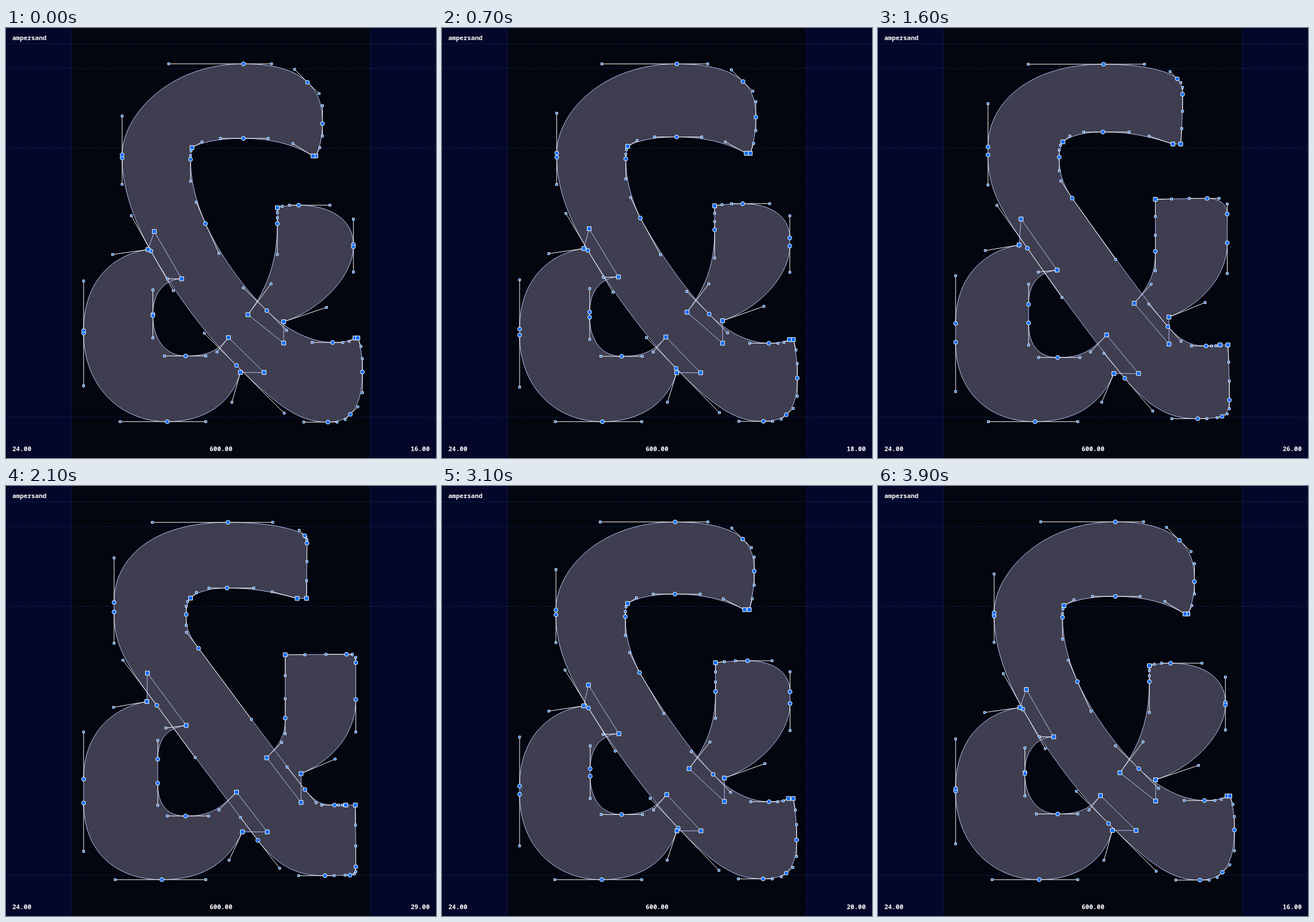
Animation of 748x748 px, one loop 4000 ms. Source, as an HTML page with a canvas:

```html
<!DOCTYPE html>
<html lang="en">
<head>
<meta charset="utf-8">
<title>ampersand</title>
<style>
  html, body { margin: 0; width: 100%; height: 100%; overflow: hidden; background: #04072a; }
  canvas { display: block; }
</style>
</head>
<body>
<canvas id="stage" width="748" height="748"></canvas>
<script>
const ctx = document.getElementById('stage').getContext('2d');
const LOOP = 4000, STEP = 100;
const LEFT = 114, RIGHT = 633.5;

// Each contour is drawn twice with the same commands: round pose, then square pose.
const stem = [
  `M413 62.3 C462 62.3 502 72 524.5 94.5 C544.5 114 550.5 135 550.5 166.3 C550.5 188 546 208 539 222.5
   L534 222.5 C499 201 456 192 413 192 C373 192 341 198 323.5 208 C322 213.5 321 222 321 228.5
   C321 266.5 331 303 347 340.3 C370.5 392 413 452 453.7 491.7 C488 526 532.5 547 568 547
   C586 547 597 545 607 539.3 L612 539.3 C617.5 554 620 575 620 598.3 C620 634.5 612 659 599 672
   C590 681 576 685.5 560 685.5 C518 685.5 484 670 401 587 C345 531 291 457 252 388
   C218 326.5 202 272 202 226 L202 220.7 C202 153 283 62.3 413 62.3`,
  `M386 63.2 C464 63.2 510 77 519.5 86.5 C521.5 89 523.5 93.5 523.5 99.5 C523.5 131.5 523 164.5 522.7 195.5
   L506.5 195.5 C463 184 431 177.5 384.5 177.5 C353 177.5 331.5 185 321 195 C316 201 313.5 209 313.5 223.5
   C313.5 242.5 314 254.5 335 282.3 C427 406 489 489 520 528 C539.5 551 549 555 571.5 555
   C578.5 555 585 555 591 555 L607.7 555 C608 590 608.5 626 608.5 662.3 C608.5 671 606 675 598.3 677
   C590 677 571 677.8 555 677.8 C509 677.8 476 665 438 616.3 C408 576.5 329 472.5 262.3 381.5
   C203.5 303 188 273.5 188 219 L188 202.5 C188 125 254.5 63.2 386 63.2`];

const bowl = [
  `M247 385.3 L258 354 L305.5 436.3 C281 436.3 255.5 455.5 255.5 498 L255.5 500.3
   C255.5 539 275.5 570.5 312.5 570.5 C347.5 570.5 367 563.5 387 538.5 L449 599.2 L407.7 599.2
   C393 651 347.5 684.8 280.5 684.8 C198.5 684.8 135 622.5 135 530.7 L135 526.5
   C135 440 185.5 394 247 385.3`,
  `M245 375 L246 325.5 L313.5 416.5 C278 421 264 442.5 264 475.3 L264 517
   C264 555.5 280.5 574 312.5 574 C352.5 574 370.5 563.5 401 532.5 L454.5 601.7 L411.2 601.7
   C388 651 347.5 684.8 271 684.8 C190 684.8 135 635.5 135 551.5 L135 510
   C135 428 187 385 245 375`];

const arm = [
  `M472 312.5 C480.5 310 493 308.2 509 308.2 C563.5 308.2 604.3 332.5 604.3 376.8 L604.3 380.7
   C604.3 424.5 557.5 486 483 511 L483 548 L420.8 498.7 C461 445 472 394 472 340.3
   C472 330 472 321 472 312.5`,
  `M485.7 293.5 C520 293.5 556.5 292.7 592.3 292.7 C602.5 292.7 608.5 298 608.5 307.3 L608.5 371.5
   C608.5 428 572.5 475 513.3 500.3 L513.3 550.5 L453.5 472.7 C479.5 446 485.7 431 485.7 403.7
   C485.7 370 485.7 330 485.7 293.5`];

// One list of coordinates per command; the last pair is the node.
const parse = d => d.match(/[MLC][^MLC]+/g).map(s => s.slice(1).trim().split(/\s+/).map(Number));

// A node is a corner when the directions before and after it disagree.
function findCorners(segs) {
  return segs.map((seg, i) => {
    if (i === 0) return false;
    const [x, y] = seg.slice(-2);
    const before = seg.length === 6 ? seg.slice(2, 4) : segs[i - 1].slice(-2);
    const after = segs[i + 1] || segs[1];
    const a = Math.atan2(y - before[1], x - before[0]);
    const b = Math.atan2(after[1] - y, after[0] - x);
    return Math.cos(a - b) < 0.97;
  });
}

const contours = [stem, bowl, arm].map(([round, square]) => {
  const from = parse(round);
  return { from, to: parse(square), corners: findCorners(from) };
});

function box(x, y, size) {
  ctx.beginPath();
  ctx.rect(x - size / 2, y - size / 2, size, size);
  ctx.fill();
  ctx.stroke();
}

function dot(x, y) {
  ctx.beginPath();
  ctx.arc(x, y, 3.5, 0, 2 * Math.PI);
  ctx.fill();
  ctx.stroke();
}

function line(x1, y1, x2, y2) {
  ctx.beginPath();
  ctx.moveTo(x1, y1);
  ctx.lineTo(x2, y2);
  ctx.stroke();
}

function label(text, x, y, align) {
  ctx.textAlign = align;
  ctx.fillText(text, x, y);
}

function drawBackground() {
  ctx.fillStyle = '#04072a';
  ctx.fillRect(0, 0, 748, 748);
  ctx.fillStyle = '#03050f';
  ctx.fillRect(LEFT, 0, RIGHT - LEFT, 748);
  ctx.lineWidth = 1;
  ctx.strokeStyle = '#12408c';
  ctx.setLineDash([1, 2]);
  for (const y of [27.5, 70.5, 209.5, 677]) line(0, y, 748, y);
  for (const x of [LEFT, RIGHT]) line(x, 0, x, 748);
  ctx.setLineDash([]);
}

function drawGlyph(shapes) {
  ctx.beginPath();
  for (const segs of shapes) {
    for (const seg of segs) {
      if (seg === segs[0]) ctx.moveTo(...seg);
      else if (seg.length === 2) ctx.lineTo(...seg);
      else ctx.bezierCurveTo(...seg);
    }
    ctx.closePath();
  }
  ctx.fillStyle = '#3e3e50';
  ctx.strokeStyle = '#b8c2f4';
  ctx.fill();
  ctx.stroke();
}

function drawControls(shapes) {
  const handles = [];
  for (const segs of shapes) {
    segs.forEach((seg, i) => {
      if (seg.length < 6) return;
      const [x1, y1, x2, y2, x, y] = seg;
      handles.push([...segs[i - 1].slice(-2), x1, y1], [x, y, x2, y2]);
    });
  }
  ctx.strokeStyle = '#fff';
  ctx.fillStyle = '#0a6cff';
  for (const h of handles) line(...h);
  for (const [, , x, y] of handles) box(x, y, 3.6);
  shapes.forEach((segs, c) => {
    const { corners } = contours[c];
    segs.forEach((seg, i) => {
      const [x, y] = seg.slice(-2);
      const closing = c === 0 || i > 0;
      if (i === 0 || !closing) return;
      if (corners[i]) box(x, y, 7);
      else dot(x, y);
    });
  });
}

function drawLabels(p) {
  ctx.fillStyle = '#fff';
  ctx.font = '600 11px "Noto Sans Mono", "DejaVu Sans Mono", monospace';
  label('ampersand', 11, 21, 'left');
  label('24.00', 11, 736, 'left');
  label('600.00', 374, 736, 'center');
  label((16 + Math.round(13 * p)).toFixed(2), 737, 736, 'right');
}

// Slow start, sharp turn at the middle of the loop.
function progress(t) {
  const x = 1 - Math.abs(t - LOOP / 2) / (LOOP / 2);
  return x < 0.06 ? 0 : (1 - Math.cos(1.8 * x)) / 1.139;
}

function render(now) {
  const p = progress(Math.floor((now % LOOP) / STEP) * STEP);
  const shapes = contours.map(({ from, to }) =>
    from.map((seg, i) => seg.map((v, k) => v + (to[i][k] - v) * p)));
  drawBackground();
  drawGlyph(shapes);
  drawControls(shapes);
  drawLabels(p);
}

function tick() {
  render(performance.now());
  requestAnimationFrame(tick);
}
tick();
</script>
</body>
</html>
```
